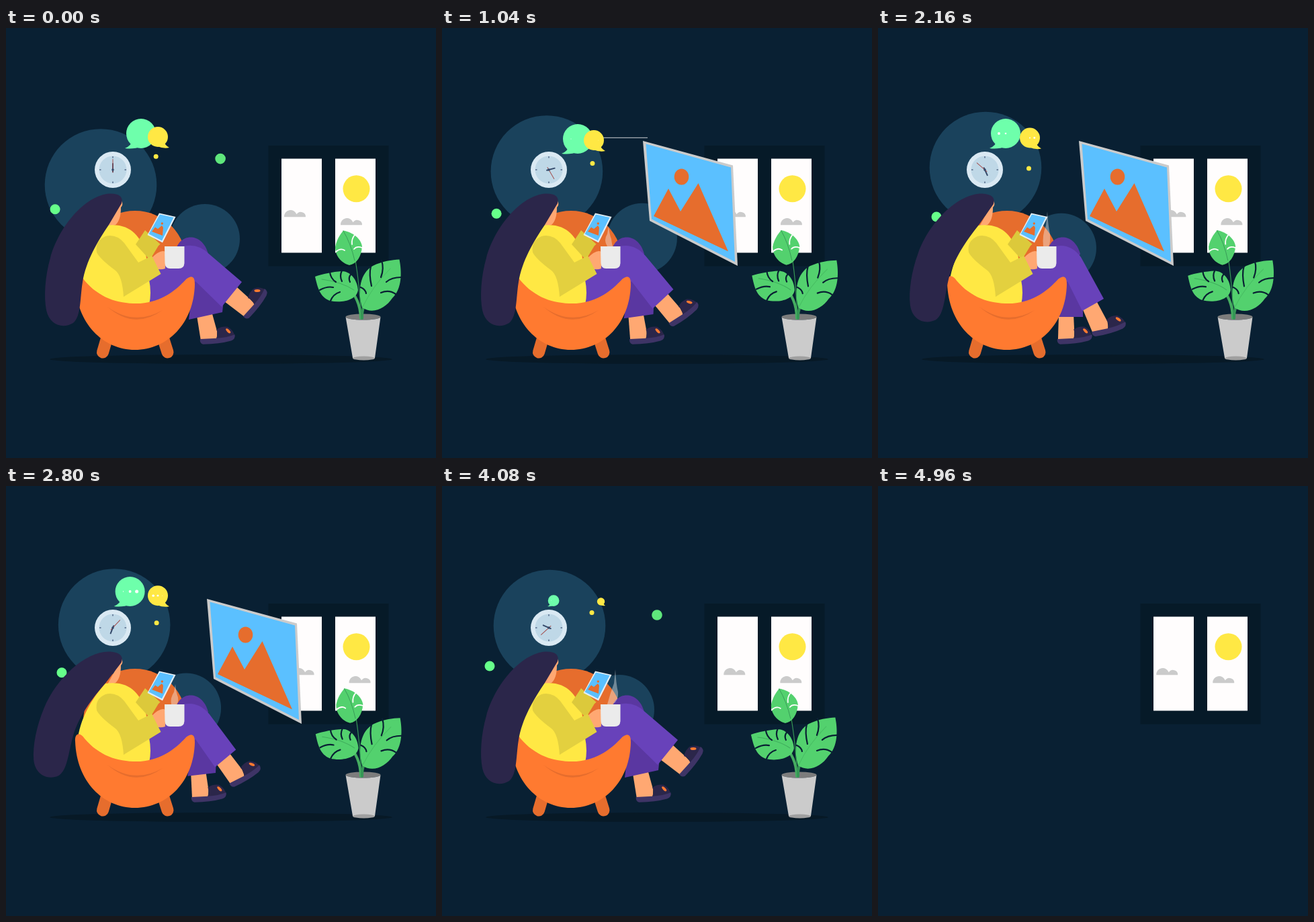
Recreate the animation shown at these times as an HTML page with a canvas. Size 640 by 640 pixels, loop 5 s.

```html
<!DOCTYPE html>
<html lang="en">
<head>
<meta charset="utf-8">
<title>Reading at the window</title>
<style>
html, body { margin: 0; height: 100%; overflow: hidden; background: #092033; }
canvas { display: block; width: 640px; height: 640px; }
</style>
</head>
<body>
<canvas id="stage" width="640" height="640"></canvas>
<script>
const ctx = document.getElementById('stage').getContext('2d');
const LOOP = 5000, STEP = 40;
const C = {
  bg: '#092033', frame: '#061a28', floor: '#071926', disc: '#1a425c', white: '#fffdfd',
  yellow: '#ffe844', sleeve: '#e3d03f', orange: '#ff7a30', rust: '#e66d2d', skin: '#ffa872',
  hair: '#2b264a', purple: '#6842ba', plum: '#5a37a1', sole: '#3e3466', grey: '#cbcbcb',
  mint: '#6effab', lime: '#66ff8a', leaf: '#53d16e', stem: '#369656', sky: '#5bc0ff'
};

const mix = (a, b, k) => a + (b - a) * k;
const clamp = v => Math.max(0, Math.min(1, v));

// Smooth monotone curve through [time, value] points.
function track(t, pts) {
  const n = pts.length - 1;
  if (t <= pts[0][0]) return pts[0][1];
  if (t >= pts[n][0]) return pts[n][1];
  let i = 0;
  while (t > pts[i + 1][0]) i++;
  const slope = j => (pts[j + 1][1] - pts[j][1]) / (pts[j + 1][0] - pts[j][0]);
  const tangent = j => {
    if (j === 0) return slope(0);
    if (j === n) return slope(n - 1);
    const a = slope(j - 1), b = slope(j);
    return a * b <= 0 ? 0 : 2 * a * b / (a + b);
  };
  const h = pts[i + 1][0] - pts[i][0], u = (t - pts[i][0]) / h, v = 1 - u;
  return pts[i][1] * v * v * (1 + 2 * u) + pts[i + 1][1] * u * u * (3 - 2 * u)
    + h * u * v * (v * tangent(i) - u * tangent(i + 1));
}

function fill(d, color) {
  ctx.fillStyle = color;
  ctx.fill(new Path2D(d));
}
function line(d, color, width, cap = 'round') {
  ctx.strokeStyle = color;
  ctx.lineWidth = width;
  ctx.lineCap = cap;
  ctx.stroke(new Path2D(d));
}
function oval(x, y, rx, ry, color, turn = 0) {
  ctx.fillStyle = color;
  ctx.beginPath();
  ctx.ellipse(x, y, rx, ry, turn, 0, 7);
  ctx.fill();
}
const dot = (x, y, r, color) => oval(x, y, r, r, color);
function poly(color, pts) {
  ctx.fillStyle = color;
  ctx.beginPath();
  pts.forEach(p => ctx.lineTo(p[0], p[1]));
  ctx.fill();
}
function at(x, y, degrees, scale, draw) {
  ctx.save();
  ctx.translate(x, y);
  ctx.rotate(degrees * Math.PI / 180);
  ctx.scale(scale, scale);
  draw();
  ctx.restore();
}

function cloud(x, y) {
  fill(`M${x},${y}a9.6,9.6 0 0 1 18.6,-4a7.2,7 0 0 1 13.4,4z`, C.grey);
}
function drawWindow(t) {
  ctx.fillStyle = C.frame;
  ctx.fillRect(390.5, 175, 179, 179.5);
  ctx.fillStyle = C.white;
  ctx.fillRect(410, 194.5, 60, 140);
  ctx.fillRect(490, 194.5, 60, 140);
  dot(521.5, 239.3, 20, C.yellow);
  const drift = 14.3 * (1 - Math.abs(1 - t / 2500));
  cloud(414 + drift, 281.3);
  cloud(498 + drift, 293.3);
}

function drawDiscs(t) {
  const rise = track(t, [[0, 0], [440, .436], [1040, .727], [2160, .927], [3280, 1], [4080, .927], [4480, .44], [5000, 0]]);
  dot(141 + 20.5 * rise, 233.5 - 27.5 * rise, 83.3, C.disc);
  const slide = track(t, [[0, 0], [440, -.1], [1040, -.06], [2160, .72], [3280, .94], [4080, 1], [5000, 0]]);
  dot(296 - 32 * slide, 314 + 19 * slide, 52, C.disc);
  const bob = track(t, [[0, .13], [440, .31], [1040, .63], [2160, 1], [3280, .45], [4080, 0], [5000, .13]]);
  dot(71 + 16 * bob, 268 + 13 * bob, 7.5, C.lime);
  dot(320 - 7 * bob, 192 + 20 * bob, 7.8, '#5fe67c');
  dot(223 + 1.5 * bob, 188.5 + 20.5 * bob, 3.5, C.yellow);
}

function drawClock(t) {
  dot(159, 211, 27, '#dae9f3');
  dot(159, 211, 20.5, '#bfd8e7');
  for (let a = 0; a < 360; a += 90)
    at(159, 211, a, 1, () => line('M0,-20V-17.5', '#3c4f74', 1.2, 'butt'));
  at(159, 211, t / LOOP * 360, 1, () => line('M0,3V-9', '#34496a', 2));
  at(159, 211, t / LOOP * 720, 1, () => line('M0,4V-15.5', '#a4504f', 1));
  dot(159, 211, 1.8, '#34496a');
}

function bubbleDots(phase, x, y, gap, size) {
  [.8, 1, .8].forEach((big, i) => {
    const p = phase - i * 75;
    const s = clamp(p / 230) * clamp((850 - p) / 230);
    dot(x + (i - 1) * gap, y, size * big * s, C.white);
  });
}
function drawBubbles(t) {
  const size = 1 - track(t, [[3860, 0], [4080, .62], [4200, 1]]);
  if (size <= 0) return;
  const phase = t % 1000;
  const x = track(t, [[0, 177], [440, 177], [1040, 178], [2160, 166], [3280, 158], [3800, 157]]);
  const y = track(t, [[0, 179], [440, 189], [1040, 187], [2160, 179], [3280, 179]]);
  at(x, y, 0, size, () => {
    dot(24, -22, 22, C.mint);
    fill('M0,0Q10,-4 12,-14L26,-3Q12,2 0,0Z', C.mint);
    bubbleDots(phase, 24, -22, 10, 3.6);
  });
  const dy = track(t, [[0, 178], [440, 186.5], [1040, 183], [2160, 179.5], [3280, 179], [4080, 178]]);
  at(243, dy, 0, size, () => {
    dot(-17, -16, 15, C.yellow);
    fill('M0,0Q-7,-4 -8,-10L-18,-2Q-8,2 0,0Z', C.yellow);
    ctx.scale(-1, 1);
    bubbleDots(phase, 17, -16, 6.8, 2.6);
  });
}
function drawStreak(t) {
  const head = track(t, [[380, 324], [440, 309], [1040, 225], [1300, 215]]);
  const tail = track(t, [[440, 324], [1040, 306], [1600, 215]]);
  if (tail - head > .5) line(`M${head},163.3H${tail}`, '#a5adb3', 1.3, 'butt');
}

function drawPicture(t) {
  const s = t < 2000
    ? track(t, [[0, 0], [440, .85], [760, 1]])
    : track(t, [[2800, 1], [3280, .3], [3480, 0]]);
  if (s <= 0) return;
  at(226 + 144 * s, 306 - 53 * s, 0, s, () => {
    ctx.translate(-370, -253);
    fill('M299,168L433,204.5L440,354L309,287Z', C.grey);
    fill('M303.5,172.5L430,207.5L436,348L312,284.5Z', C.sky);
    oval(356.5, 221.5, 10.8, 12, C.rust);
    fill('M315,280L337,239L355,273L381.5,231L426,332.5Z', C.rust);
  });
}

// Shoe with its heel at (x, y); returns a mapper from shoe space to stage.
function shoeSpace(x, y, degrees) {
  const a = degrees * Math.PI / 180, c = Math.cos(a), s = Math.sin(a);
  return (px, py) => [x + px * c - py * s, y + px * s + py * c];
}
function drawShoe(x, y, degrees) {
  at(x, y, degrees, 1, () => {
    fill('M24,-3Q28,-12 25,-17Q33,-22 42,-20Q51,-14 52,-5Z', C.hair);
    fill('M0,-4L25,-4Q40,-4 52,-8Q53,-1 46,1Q28,5 4,4Q-1,2 0,-4Z', C.sole);
    oval(42.5, -14, 4.5, 2, C.orange, .85);
  });
}
function drawLegs(k) {
  const p = (x0, y0, x1, y1) => [mix(x0, x1, k), mix(y0, y1, k)];
  const leg = (hemA, hemB, x, y, turn) => {
    const to = shoeSpace(x, y, turn);
    poly(C.skin, [hemA, hemB, to(26, -14), to(25, -2), to(1, -2)]);
    drawShoe(x, y, turn);
  };
  leg(p(284, 428, 269, 428), p(306, 422, 291, 426), mix(289, 267, k), 467, -3);
  fill('M252,335C255,305 292,302 301,336L290,360L250,350Z', C.plum);
  poly(C.plum, [[270, 350], [305, 370], p(324, 405, 305, 405), p(322, 423, 305, 430), p(272, 434, 269, 430), [276, 400]]);
  leg(p(325, 407, 304, 417), p(344, 386, 326, 408), mix(356, 319, k), mix(432, 456, k), mix(-48, -12, k));
  const [hx, hy] = p(351, 378, 336, 403), [lx, ly] = p(321, 415, 304, 421);
  const [kx, ky] = p(303, 337, 302, 341);
  fill(`M208,412V370L236,352L264,325Q286,320 ${kx},${ky}L${hx},${hy}L${lx},${ly}L282,377L250,410Z`, C.purple);
}

function drawSteam(t) {
  const h = track(t, [[0, 0], [440, 14], [1040, 31], [2160, 52], [2600, 30], [3280, 33], [4080, 52], [4500, 0]]);
  if (h < 1) return;
  const x = track(t, [[440, 252], [1040, 248], [2160, 252], [3280, 252], [4080, 258]]);
  const y = 325 - h;
  ctx.globalAlpha = .4;
  fill(`M${x},${y}Q${x + 1},${y + h * .4} ${x + 4},${y + h * .65}Q${x + 5},${y + h * .9} 254,325H246Q${x - 8},${y + h * .7} ${x - 2},${y + h * .4}Z`, '#f2f2f2');
  ctx.globalAlpha = 1;
}

function drawPerson(t) {
  const stretch = track(t, [[440, 0], [1040, .44], [1800, 1], [2300, 1], [3240, 0]]);
  oval(192, 350, 77, 78, C.rust);
  line('M150,462L144,482.5M234,462L240.5,482.5', C.rust, 18);
  drawLegs(stretch);
  drawPicture(t);
  fill('M172,257Q175,263 171,267Q171,286 163,293L150,297Z', C.skin);
  fill('M148,294C185,289 200,310 208,335L213,375Q217,394 213,412H165L107,375C112,340 133,310 148,294Z', C.yellow);
  fill('M207,301L231,323L214,345L193,322Z', '#dcc93b');
  fill('M227,324L234,318L239,326L228,336L220,346L216,342Z', C.rust);
  fill('M216,343Q230,329 237,333V358Q226,362 218,354Z', C.skin);
  fill('M175,400L230.5,366L217,339L197,349L176,320Q164,306 148,310Q132,317 135,334Q140,344 163,361Q173,369 175,400Z', C.sleeve);

  fill('M228,275.5L252.5,281L233,319.5L210.5,308Z', '#e3eef5');
  fill('M229,277.5L249.5,282L232,316.5L212.5,306.5Z', C.sky);
  dot(232.3, 291, 1.7, C.rust);
  fill('M217,303L222,296.5L226,299L232,294L234,297L233,309Z', C.rust);

  drawSteam(t);
  fill('M236,325H265.5V350Q265,358 257,358H244Q237,358 236.5,350Z', '#ebebeb');

  fill('M103,380C102,368 110,365 117,376C140,403 168,411 200,410C233,407 252,391 268,374Q281,364 281,381C280,440 240,479 192,479C145,479 105,440 103,380Z', C.orange);
  fill('M151,415Q191,444 233,420Q191,450 151,415Z', C.rust);

  const sway = track(t, [[1120, 0], [1480, 5.4], [1840, 4.1], [2160, 4.4], [2880, 7], [3280, 5.3], [3640, 1.4], [3960, 0]]);
  at(155, 258, sway, 1, () => {
    ctx.translate(-155, -258);
    fill('M172,261Q176,246 154,246.5C118,249 79,295 66,342C58,370 56,400 60,420C65,443 85,448 100,439C112,429 110,402 114,378C119,347 136,318 153,293Z', C.hair);
  });
}

function drawPlant(t) {
  const sway = track(t, [[0, 0], [440, 1], [1040, 1.2], [2160, 1.15], [3280, .3], [4080, -.1], [5000, 0]]);
  oval(531.5, 430, 26, 4.5, '#7c7c7c');
  at(529, 432, sway, 1, () => {
    ctx.translate(-529, -432);
    line('M528,432Q527,402 508,386', '#45ad60', 4);
    line('M530,432Q529,412 545,394', C.stem, 4);
    line('M529,430C527,400 525,375 520,346', C.stem, 1.2);
    fill('M530,416C523,390 527,365 546,354C560,347 575,345 585.5,344.5C589,362 590,388 575,402C565,417 546,427 530,416Z', C.leaf);
    line('M531,415Q545,385 572,358', '#48be63', 1);
    line('M559,346Q563,358 558,371M543,355Q540,366 544,384M588,371Q574,371 566,378M580,396Q570,389 558,394M528,386Q535,389 536,395', C.bg, 2.2);
    fill('M524,390C523,374 512,362 500,362C486,363 471,366 460,370C464,387 467,400 482,406C500,410 522,405 524,390Z', C.leaf);
    line('M470,374Q500,378 518,390', '#3fae5c', 1);
    line('M482,363Q483,373 491,378M500,361Q496,369 500,377M467,390Q478,384 487,386M483,406Q487,396 497,393M513,367Q509,372 512,378', C.bg, 2.2);
    fill('M502,301.5C516,304 528,313 530,325C529,340 522,351 511,353C499,350 490,339 490,326C492,315 497,308 502,301.5Z', C.leaf);
    line('M502,302Q513,320 519,346', C.stem, .9);
    line('M519,308Q514,314 515,322M530,327Q522,324 518,329M491,333Q498,327 504,331', C.white, 1.8);
  });
  fill('M505.5,430A26,4.5 0 0 0 557.5,430L549,491H516Z', C.grey);
  oval(532.5, 491.5, 16.5, 3, '#a0a0a0');
}

function render(t) {
  ctx.fillStyle = C.bg;
  ctx.fillRect(0, 0, 640, 640);
  const lit = t < LOOP - STEP;
  if (lit) {
    drawDiscs(t);
    oval(320, 493, 255, 7, C.floor);
  }
  drawWindow(t);
  if (!lit) return;
  drawClock(t);
  drawStreak(t);
  drawBubbles(t);
  drawPlant(t);
  drawPerson(t);
}

const start = performance.now();
function tick() {
  const t = (performance.now() - start) % LOOP;
  render(Math.floor(t / STEP) * STEP);
  requestAnimationFrame(tick);
}
tick();
</script>
</body>
</html>
```
